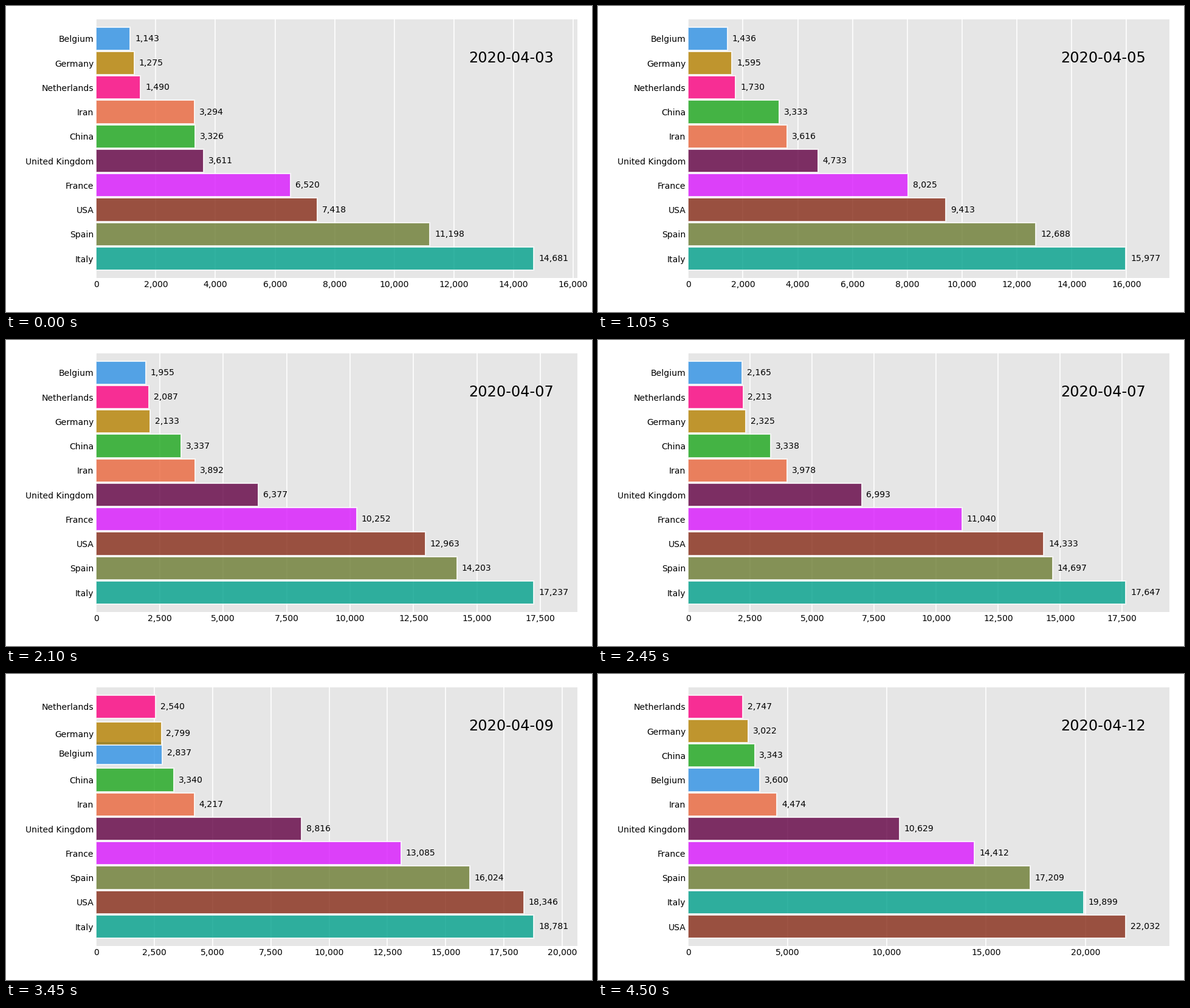
A matplotlib script that plays this animation: 964 px wide and 504 px high, repeating every 4550 ms.

```python
import matplotlib.pyplot as plt
import numpy as np
from matplotlib.animation import FuncAnimation

W, H, DPI = 964, 504, 144
STEPS = 10          # frames per day
FIRST_DAY, DAYS = 3, 10
LEFT, RIGHT, TOP, BOTTOM = 148.25, 940.3, 21.62, 448.27

# name: (colour, total on each key day); a cubic gives the days between
KEY_DAYS = range(0, DAYS, 3)
SERIES = {
    "Belgium": ("#2E91E5", [1143, 1632, 2523, 3600]),
    "China": ("#1CA71C", [3326, 3335, 3339, 3343]),
    "France": ("#DA16FF", [6520, 8926, 12228, 14412]),
    "Germany": ("#B68100", [1275, 1810, 2607, 3022]),
    "Iran": ("#EB663B", [3294, 3739, 4110, 4474]),
    "Italy": ("#00A08B", [14681, 16523, 18279, 19899]),
    "Netherlands": ("#FC0080", [1490, 1874, 2403, 2747]),
    "Spain": ("#6C7C32", [11198, 13341, 15447, 17209]),
    "USA": ("#862A16", [7418, 10783, 16553, 22032]),
    "United Kingdom": ("#620042", [3611, 5385, 7993, 10629]),
}

names = list(SERIES)
colors = [color for color, _ in SERIES.values()]
key_totals = np.array([keys for _, keys in SERIES.values()]).T
cubics = np.polyfit(KEY_DAYS, key_totals, 3)
totals = np.round(np.vander(np.arange(DAYS), 4) @ cubics)
ranks = totals.argsort(axis=1, kind="stable").argsort(axis=1) + 1
slots = len(names) + 1 - ranks      # largest total sits at the bottom

plt.rcParams["font.family"] = "DejaVu Sans"
fig = plt.figure(figsize=(W / DPI, H / DPI), dpi=DPI, facecolor="white")
ax = fig.add_axes([LEFT / W, 1 - BOTTOM / H, (RIGHT - LEFT) / W, (BOTTOM - TOP) / H])
ax.set_facecolor("0.9")
ax.set_axisbelow(True)
ax.grid(True, axis="x", color="white")
ax.tick_params(labelsize=7, length=0, pad=2)
ax.xaxis.set_major_formatter("{x:,.0f}")
ax.spines[:].set_visible(False)

bars = ax.barh(slots[0], totals[0], height=0.95, color=colors,
               edgecolor="white", linewidth=1, alpha=0.8)
counts = [ax.text(0, 0, "", size=7, va="center") for _ in names]
date = ax.text(0.95, 0.85, "", size=12, ha="right", va="center",
               transform=ax.transAxes)
ax.set_ylim(0.2, len(names) + 0.8)


def blend(table, day, part):
    following = min(day + 1, DAYS - 1)
    return table[day] * (1 - part) + table[following] * part


def update(frame):
    day, step = divmod(frame, STEPS)
    lengths = blend(totals, day, step / STEPS)
    heights = blend(slots, day, step / STEPS)
    x_max = lengths.max() * 1.1
    ax.set_xlim(0, x_max)
    ax.set_yticks(heights, names)
    for bar, count, x, y in zip(bars, counts, lengths, heights):
        bar.set_width(x)
        bar.set_y(y - bar.get_height() / 2)
        count.set_position((x + 0.01 * x_max, y))
        count.set_text(f"{x:,.0f}")
    date.set_text(f"2020-04-{FIRST_DAY + day:02d}")
    return [*bars, *counts, date]


anim = FuncAnimation(fig, update, frames=(DAYS - 1) * STEPS + 1, interval=50,
                     repeat=True, repeat_delay=0)
plt.show()
```
